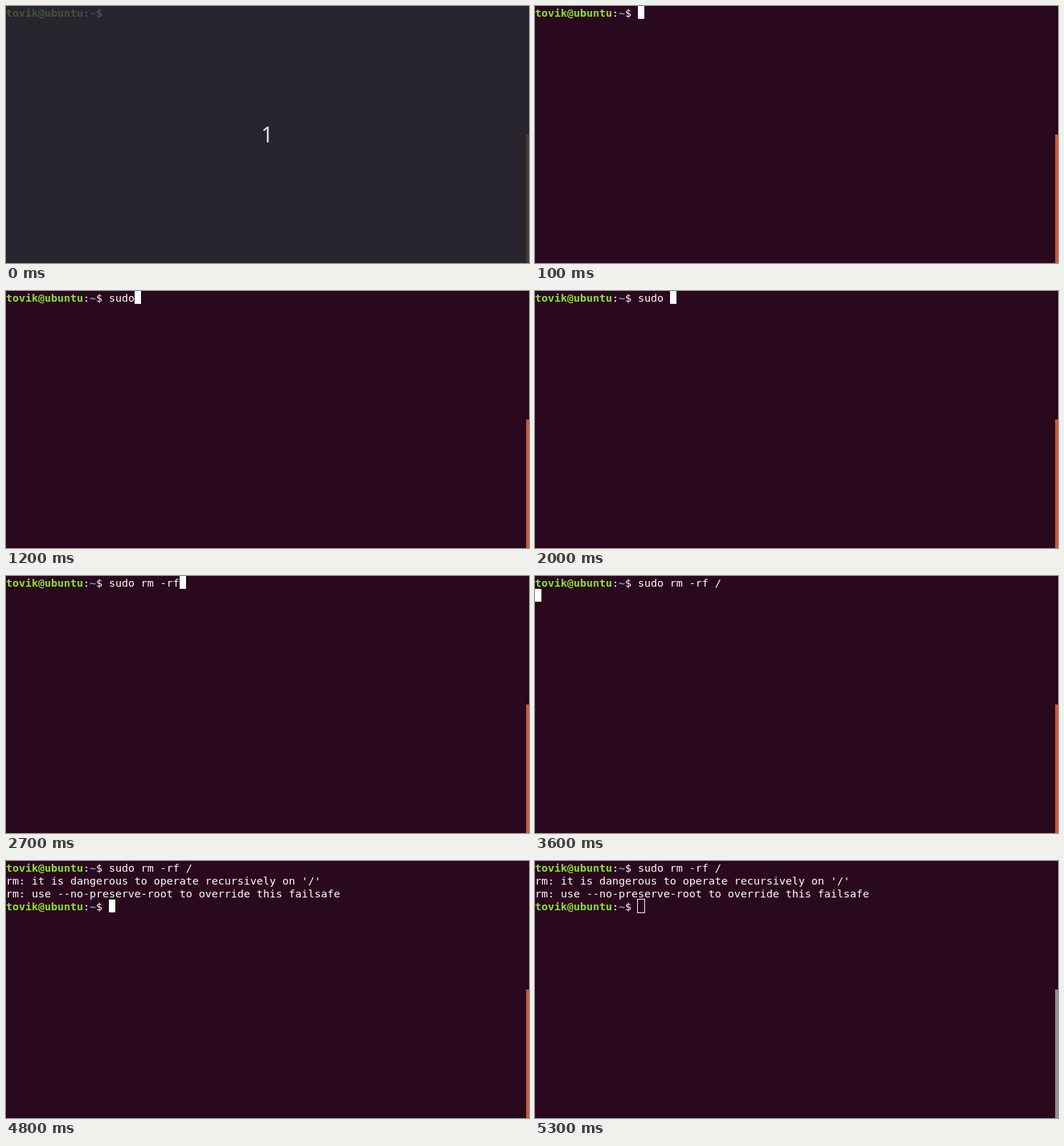
Animation of 732x360 px, one loop 5400 ms. Source, as an HTML page:

```html
<!DOCTYPE html>
<html lang="en">
<head>
<meta charset="utf-8">
<title>Terminal</title>
<style>
  html, body { margin: 0; width: 100%; height: 100%; overflow: hidden; background: #2a091e; }
  svg { display: block; width: 732px; height: 360px; }
  .term { font: 14.95px "DejaVu Sans Mono", monospace; fill: #fff; white-space: pre; }
  .user { font-weight: bold; fill: #8ae234; }
  .path { font-weight: bold; fill: #729fcf; }
  .count { font: 30px "Noto Sans", sans-serif; fill: #dedee2; }
</style>
</head>
<body>
<svg viewBox="0 0 732 360">
  <rect width="732" height="360" fill="#2a091e"/>
  <rect x="728" width="4" height="360" fill="#25081b"/>
  <rect id="bar" x="728" y="180" width="4" height="180"/>
  <g id="lines" class="term"></g>
  <rect id="block" width="9" height="18" fill="#fff"/>
  <rect id="hollow" x="143.5" y="53.5" width="10" height="19" fill="none" stroke="#fff"/>
  <g id="overlay">
    <rect width="732" height="360" fill="#282e34" fill-opacity=".77"/>
    <text class="count" x="357" y="191">1</text>
  </g>
</svg>
<script>
const LOOP = 5400, COL = 9, ROW = 18, PROMPT_COLS = 16;
const $ = id => document.getElementById(id);

const prompt = '<tspan class="user">tovik@ubuntu</tspan>:<tspan class="path">~</tspan>$ ';
const output = [
  "rm: it is dangerous to operate recursively on '/'",
  "rm: use --no-preserve-root to override this failsafe"
];
const command = "sudo rm -rf /";

// [start in ms, characters typed]
const typing = [[0, 0], [1100, 2], [1200, 4], [2000, 5], [2100, 6], [2200, 8],
                [2400, 9], [2600, 10], [2700, 11], [3200, 13]];
// spans in which the block cursor is hidden
const hidden = [[0, 100], [900, 1100], [4100, 4800], [5200, LOOP]];
const ENTER = 3600, PRINT = 4000, BLUR = 5200, GREY = 5300;

const show = (el, on) => el.setAttribute("visibility", on ? "visible" : "hidden");

function barColor(t) {
  if (t >= GREY) return "#8f8f8f";
  return t >= BLUR ? "#ad7463" : "#cb5a37";
}

let shown = "";
function setLines(lines) {
  const html = lines.map((s, i) => `<text y="${i * ROW + 15}" xml:space="preserve">${s}</text>`).join("");
  if (html !== shown) $("lines").innerHTML = shown = html;
}

function draw(t) {
  const typed = typing.filter(([start]) => start <= t).pop()[1];
  const lines = [prompt + command.slice(0, typed)];
  let col = PROMPT_COLS + typed, row = 0;
  if (t >= PRINT) {
    lines.push(...output, prompt);
    col = PROMPT_COLS;
    row = 3;
  } else if (t >= ENTER) {
    col = 0;
    row = 1;
  }
  setLines(lines);

  $("block").setAttribute("x", col * COL);
  $("block").setAttribute("y", row * ROW);
  show($("block"), !hidden.some(([a, b]) => t >= a && t < b));
  show($("hollow"), t >= BLUR);
  show($("overlay"), t < 100);
  $("bar").setAttribute("fill", barColor(t));
}

const begin = performance.now();
function tick() {
  draw((performance.now() - begin) % LOOP);
  requestAnimationFrame(tick);
}
tick();
</script>
</body>
</html>
```
